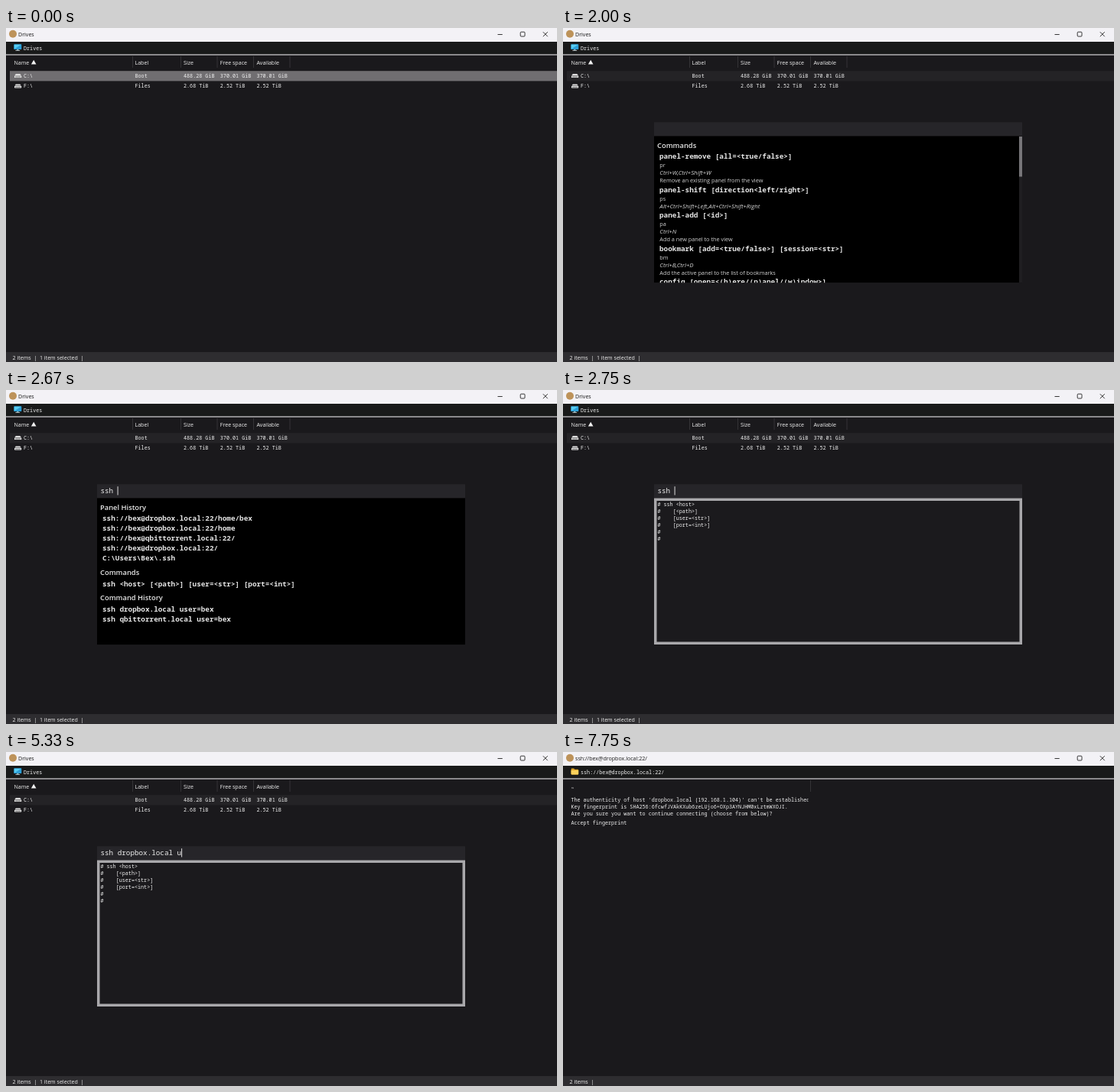
Write an HTML page that moves like this. It is 720 px wide and 437 px high and loops after 8 s.

```html
<!DOCTYPE html>
<html lang="en">
<head>
<meta charset="utf-8">
<title>Drives</title>
<style>
  html, body { margin: 0; width: 100%; height: 100%; overflow: hidden; background: #1a191c; }
  svg { display: block; width: 100vw; height: 100vh; }
  text { white-space: pre; fill: #f0f0f0; }
  .ui { font: 7.08px "Open Sans", "Noto Sans", sans-serif; }
  .title { fill: #1a1a1a; }
  .note { font-size: 7.3px; fill: #d2d2d2; }
  .keys { font-size: 7.85px; font-style: italic; }
  .head { font: 600 9.35px "Open Sans", "Noto Sans", sans-serif; fill: #e8e8e8; }
  .mono { font: 500 6.76px "Noto Sans Mono", "DejaVu Sans Mono", monospace; }
  .big { font-size: 9.28px; }
  .item { font-size: 9.34px; font-weight: 600; fill: #e6e6e6; }
</style>
</head>
<body>
<svg viewBox="0 0 720 437" id="stage"></svg>
<script>
const LOOP = 8000, CHAR = 5.568, INPUT_X = 123.5;
const OPEN = 2000, FILTER = 2330, HELP = 2750, CONNECT = 7170;
const COMMAND = 'ssh dropbox.local user=bex';

// [time, number of typed characters]
const typing = [[2170, 1], [2330, 2], [2500, 3], [2670, 4], [3000, 5], [3170, 6],
  [3330, 8], [3830, 11], [4170, 12], [4330, 13], [4500, 15], [4580, 16], [4750, 17],
  [5330, 19], [5830, 22], [6000, 23], [6330, 24], [6420, 25], [6580, 26]];

const escape = s => s.replace(/&/g, '&amp;').replace(/</g, '&lt;');
const text = (cls, x, y, s) => `<text class="${cls}" x="${x}" y="${y}">${escape(s)}</text>`;
const rect = (x, y, w, h, fill, more = '') =>
  `<rect x="${x}" y="${y}" width="${w}" height="${h}" fill="${fill}" ${more}/>`;
const path = (d, fill, more = '') => `<path d="${d}" fill="${fill}" ${more}/>`;
const group = (id, body, more = '') => `<g id="${id}" ${more}>${body}</g>`;
const lines = (cls, x, y, step, list) => list.map((s, i) => text(cls, x, y + i * step, s)).join('');
const divider = x => rect(x, 37, 1, 15, '#343336');

const frame =
  rect(0, 0, 720, 437, '#1a191c') +
  rect(0, 0, 720, 18, '#f3f2f6') +
  rect(0, 18, 720, 16, '#191a1a') +
  rect(0, 34, 720, 2, '#8b8a8c') +
  rect(0, 424, 720, 13, '#2e2d30') +
  '<circle cx="9" cy="7.7" r="5" fill="#bd935a"/>' +
  path('M642.5 8.5h6.2M672.2 6.2q0-1 1-1h3.8q1 0 1 1v3.8q0 1-1 1h-3.8q-1 0-1-1zM701.8 5.2l6 6m0-6l-6 6',
    'none', 'stroke="#222" stroke-width=".9"');

const driveIcon = y =>
  path(`M12.8 ${y}h5.6l1.4 2h-8.4z`, '#dedede') +
  rect(11, y + 2.5, 9.2, 2.5, '#f0f0f0', 'rx=".6"') +
  rect(12, y + 3.5, 7.2, .7, '#444');

const driveRow = (y, cells) => driveIcon(y - 5) +
  cells.map((s, i) => text('mono', [23, 168.5, 232, 279.8, 327.4][i], y, s)).join('');

const drives =
  text('ui title', 16, 10.6, 'Drives') +
  rect(10.3, 21.3, 10, 6.6, '#2b9fd8', 'rx=".6"') +
  path('M10.8 21.8h9l-9 5.6z', '#58cdf2') +
  rect(14, 27.9, 2.6, 1.2, '#8aa') + rect(12.4, 29, 5.8, .9, '#b5c4cc') +
  text('mono', 23, 28.7, 'Drives') +
  ['Name', 'Label', 'Size', 'Free space', 'Available']
    .map((s, i) => text('ui', [10.5, 168.5, 232, 279.8, 327.4][i], 47.6, s)).join('') +
  path('M36.2 41.8l3.3 5.8h-6.6z', '#f0f0f0') +
  [165, 228, 275.5, 323, 370.5].map(divider).join('') +
  '<rect id="row" x="5" y="56.2" width="715" height="13.2"/>' +
  driveRow(65.1, ['C:\\', 'Boot', '488.28 GiB', '370.01 GiB', '370.01 GiB']) +
  driveRow(78.4, ['F:\\', 'Files', '2.68 TiB', '2.52 TiB', '2.52 TiB']) +
  text('ui', 8.6, 434.4, '2 items  |  1 item selected  |');

const remote =
  text('ui title', 16, 10.6, 'ssh://bex@dropbox.local:22/') +
  path('M10.6 22.4q0-.8.8-.8h2.8l1.2 1.2h4q.8 0 .8.8v5q0 .8-.8.8h-8q-.8 0-.8-.8z', '#e0a526') +
  rect(10.6, 23.9, 9.6, 5.5, '#fbd25c', 'rx=".7"') +
  text('mono', 23, 28.7, 'ssh://bex@dropbox.local:22/') +
  text('mono', 10.4, 50.4, '~') + divider(323) +
  group('prompt', lines('mono', 10.4, 64.8, 9.1, [
    "The authenticity of host 'dropbox.local (192.168.1.104)' can't be established.",
    'Key fingerprint is SHA256:6fcwfJVAkKXub6zeLUjo6+OXp3AYNJHM0xLztmWXOJI.',
    'Are you sure you want to continue connecting (choose from below)?']) +
    text('mono', 10.4, 95.3, 'Accept fingerprint'), 'clip-path="url(#column)"') +
  text('ui', 8.6, 434.4, '2 items  |');

const entry = (y, usage, alias, keys, about = '') =>
  text('mono item', 126, y, usage) +
  text('ui note', 126.3, y + 10.7, alias) +
  text('ui note keys', 126.3, y + 20.7, keys) +
  text('ui note', 126.3, y + 31, about);

const commands =
  text('head', 123, 156.6, 'Commands') +
  entry(171.4, 'panel-remove [all=<true/false>]', 'pr', 'Ctrl+W,Ctrl+Shift+W',
    'Remove an existing panel from the view') +
  entry(215.2, 'panel-shift [direction<left/right>]', 'ps', 'Alt+Ctrl+Shift+Left,Alt+Ctrl+Shift+Right') +
  entry(248.2, 'panel-add [<id>]', 'pa', 'Ctrl+N', 'Add a new panel to the view') +
  entry(291.8, 'bookmark [add=<true/false>] [session=<str>]', 'bm', 'Ctrl+B,Ctrl+D',
    'Add the active panel to the list of bookmarks') +
  text('mono item', 126, 335, 'config [open=<(h)ere/(p)anel/(w)indow>]') +
  rect(596, 141.5, 4, 191.7, '#1f1e21') +
  rect(596, 142, 4, 52.5, '#777679');

const matches =
  text('head', 123, 156.6, 'Panel History') +
  lines('mono item', 126, 171.4, 12.9, [
    'ssh://bex@dropbox.local:22/home/bex',
    'ssh://bex@dropbox.local:22/home',
    'ssh://bex@qbittorrent.local:22/',
    'ssh://bex@dropbox.local:22/',
    'C:\\Users\\Bex\\.ssh']) +
  text('head', 123, 241.8, 'Commands') +
  text('mono item', 126, 256.8, 'ssh <host> [<path>] [user=<str>] [port=<int>]') +
  text('head', 123, 275.4, 'Command History') +
  lines('mono item', 126, 290.4, 13, ['ssh dropbox.local user=bex', 'ssh qbittorrent.local user=bex']);

const help =
  rect(120.75, 143.25, 477.5, 188, '#1b1a1d', 'stroke="#a9a8ab" stroke-width="3.5"') +
  lines('mono', 123.4, 151.7, 9.15,
    ['# ssh <host>', '#    [<path>]', '#    [user=<str>]', '#    [port=<int>]', '#', '#']);

const palette =
  rect(119, 123.3, 481, 18.2, '#262529') +
  rect(119, 141.5, 481, 191.7, '#000') +
  group('commands', commands) + group('matches', matches) + group('help', help) +
  text('mono big', INPUT_X, 135.2, '').replace('<text', '<text id="input"') +
  '<rect id="caret" y="126.2" width="1" height="11.3" fill="#dcdcdc"/>';

document.getElementById('stage').innerHTML =
  '<clipPath id="column"><rect y="55" width="320.5" height="50"/></clipPath>' +
  '<clipPath id="box"><rect x="119" y="123" width="481" height="210.2"/></clipPath>' +
  frame + group('drives', drives) + group('remote', remote) +
  group('palette', palette, 'clip-path="url(#box)"');

const $ = id => document.getElementById(id);
const show = (id, on) => $(id).style.display = on ? '' : 'none';

function draw(now) {
  const t = now % LOOP;
  const typed = typing.reduce((n, [at, count]) => t >= at ? count : n, 0);
  show('drives', t < CONNECT);
  show('remote', t >= CONNECT);
  show('palette', t >= OPEN && t < CONNECT);
  show('commands', t < FILTER);
  show('matches', t >= FILTER && t < HELP);
  show('help', t >= HELP);
  show('caret', typed > 0);
  $('row').setAttribute('fill', t < OPEN ? '#706e71' : '#242326');
  $('input').textContent = COMMAND.slice(0, typed);
  $('caret').setAttribute('x', INPUT_X + typed * CHAR - .2);
  requestAnimationFrame(draw);
}
draw(performance.now());
</script>
</body>
</html>
```
